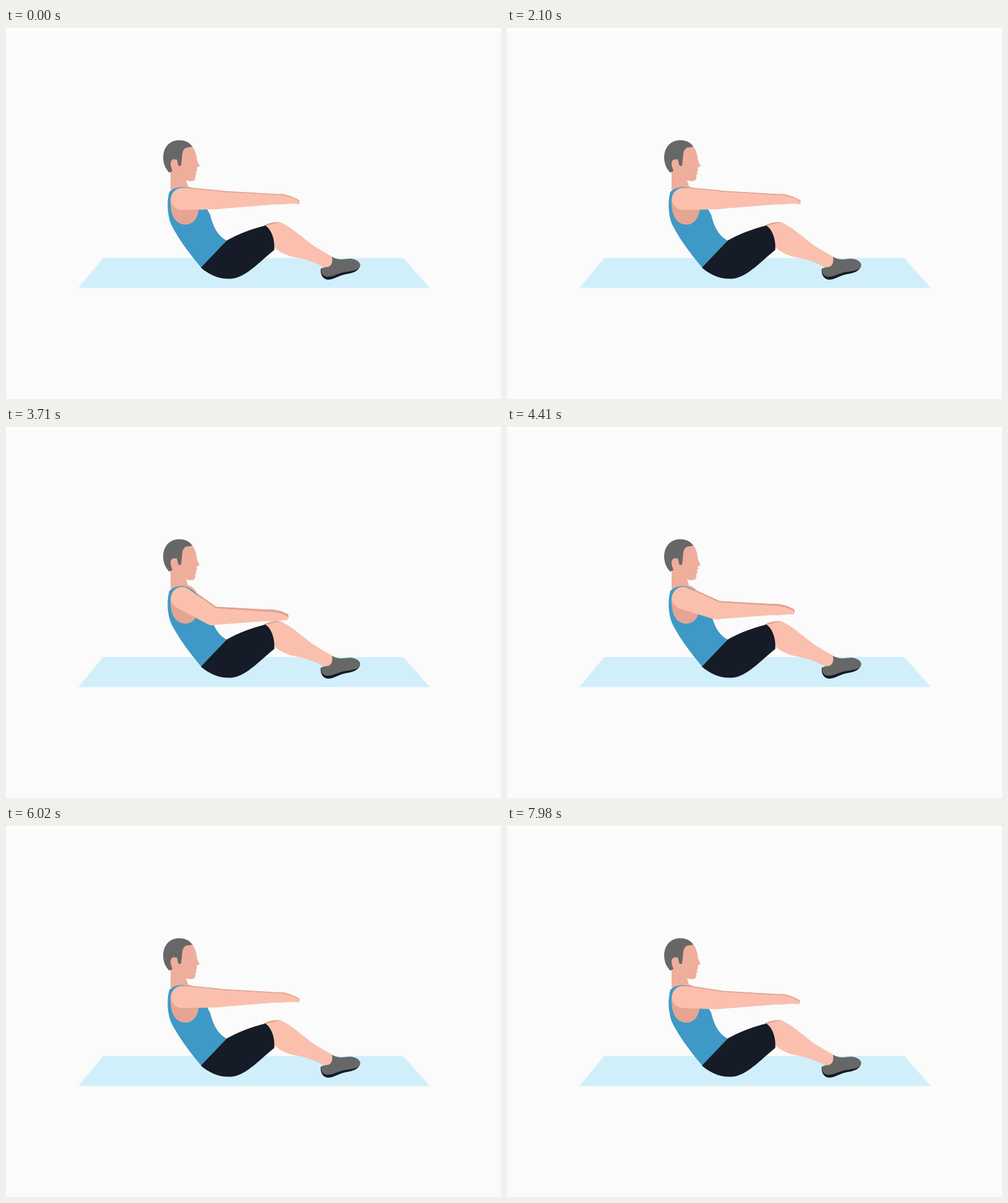
An HTML page for the animation above (8050 ms loop, 800 by 600 pixels).

```html
<!DOCTYPE html>
<html lang="en">
<head>
<meta charset="utf-8">
<title>Seated row</title>
<style>
  html, body { margin: 0; width: 100%; height: 100%; overflow: hidden; background: #fafbfa; }
  svg { display: block; width: 800px; height: 600px; }
  .skin { fill: #fac0ad; }
  .shade { fill: #eeae9b; }
  .dark { fill: #151b27; }
  .grey { fill: #676767; }
  .blue { fill: #3f99c6; }
  #near { stroke: #fac0ad; stroke-width: 1; stroke-linejoin: round; }
  #far { fill: #e0a28f; stroke: #e0a28f; stroke-width: 1; stroke-linejoin: round; }
</style>
</head>
<body>
<svg viewBox="0 0 800 600">
  <rect width="800" height="5" fill="#fff"/>
  <path fill="#d0effb" d="M157 372H642L685 420.500H117Z"/>

  <!-- head and neck -->
  <path class="shade" d="M266 225V262L292 274 308 267Q304 259 294 256L291 246Q296 249 303 247Q307 245 306 238L308 235 307 232 309 230 308 226 313 223Q308 215 308 208Q306 198 301 191L275 188Z"/>
  <path class="grey" d="M264 234C256 226 254 217 254 208C255 191 266 181 281 181.500C291 182 298 186 301 192L291 193.500Q286 196 285 203L283 222Q280 225 278 221L276 212 268 217 269 231Z"/>
  <path class="shade" d="M277 216C275 210 266 211 266 219C266 226 269 229 270 234L278 224Z"/>

  <path id="far"/>

  <!-- leg and shoe -->
  <path class="skin" d="M417 319Q430 313 443 314C462 322 481 341 500 354L529 371 529 386 513 387C500 379 485 374 468 371Q447 367 434 355Z"/>
  <path fill="#dc9f8c" d="M416 319.500Q430 313 444 314.500Q430 316 420 320Z"/>
  <path class="dark" d="M509 389C507 399 513 407 520 407C530 407 538 400 550 398C562 396 571 393 572.500 383Z"/>
  <path class="grey" d="M510 389Q514 386 520 386.500Q529 384 527 370C538 377 548 373 557 373C566 374 572 378 572.500 383C571 392 561 393 548 394.500C536 397 529 402 519 402.500C511 401 508 396 510 389Z"/>

  <!-- clothes -->
  <path class="blue" d="M264 265C272 257 284 256 292 259C308 265 320 283 330 302C334 318 340 335 357 344L316 388C292 360 276 336 267 318C260 301 260 279 264 265Z"/>
  <path class="dark" d="M315 387.500L357 343.500C375 333 400 324 419 319.500C430 326 435 345 433.500 359C412 376 390 401 368 405C346 408 328 399 315 387.500Z"/>
  <path fill="#e6a592" d="M266 285C264 264 278 259 290 261C304 266 314 282 311 297C308 313 297 319 288 318C274 316 267 305 266 285Z"/>

  <path id="near" class="skin"/>
</svg>
<script>
const FRAME = 70, LOOP = 8050, HALF = 4060, REP = 2030;
const shoulder = [284.5, 276.5];
// hand outlines relative to the wrist
const open = [[0, 7.5], [10, 7], [25, 6], [36, 7], [36, 3], [24, -3], [10, -7], [0, -7]];
const fist = [[0, 7], [12, 10], [23, 7], [25, -1], [22, -9], [14, -10], [6, -7], [0, -7]];

const lerp = (a, b, k) => a + (b - a) * k;
const ease = k => (1 - Math.cos(Math.PI * Math.min(1, Math.max(0, k)))) / 2;
const polar = ([x, y], r, a) => [x + r * Math.cos(a), y + r * Math.sin(a)];

// Tapered limb: two circles joined by their outer tangents
function limb(a, ra, b, rb) {
  const dx = b[0] - a[0], dy = b[1] - a[1];
  const dir = Math.atan2(dy, dx), d = Math.acos((ra - rb) / Math.hypot(dx, dy));
  return `M${polar(a, ra, dir + d)}L${polar(b, rb, dir + d)}` +
    `A${rb} ${rb} 0 0 0 ${polar(b, rb, dir - d)}L${polar(a, ra, dir - d)}` +
    `A${ra} ${ra} 0 1 0 ${polar(a, ra, dir + d)}Z`;
}

function arm(pull, dx, dy, thin) {
  const top = [shoulder[0] + dx, shoulder[1] + dy];
  const elbow = polar(top, lerp(59, 51, pull), lerp(2, 140, pull) * Math.PI / 180);
  const wrist = [elbow[0] + lerp(94, 68, pull), elbow[1] + lerp(-1, 2, pull)];
  const hand = open.map((p, i) => p.map((v, j) => wrist[j] + lerp(v, fist[i][j], pull)));
  return limb(top, 17.5 - thin, elbow, 14 - thin - pull) +
    limb(elbow, 13.5 - thin - pull, wrist, 7) + `M${hand.join("L")}Z`;
}

function pullAt(ms) {
  const t = ms % HALF % REP;
  return t < 980 ? ease((t - 150) / 830) : 1 - ease((t - 980) / 1010);
}

const near = document.getElementById("near"), far = document.getElementById("far");
const start = performance.now();

function draw(now) {
  const ms = Math.floor(Math.max(0, now - start) % LOOP / FRAME) * FRAME;
  const pull = pullAt(ms);
  near.setAttribute("d", arm(pull, 0, 0, 0));
  far.setAttribute("d", arm(pull, lerp(0.5, 3, pull), lerp(-1.5, -11, pull), 5 * pull));
  requestAnimationFrame(draw);
}
draw(start);
</script>
</body>
</html>
```
